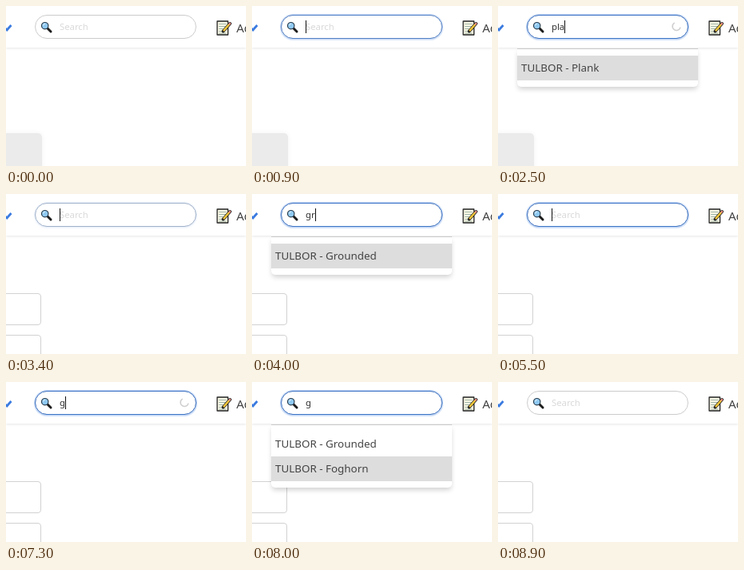
These frames come from a looping animation (300 px wide and 200 px high, 10 s). An HTML page:

```html
<!DOCTYPE html>
<html lang="en">
<head>
<meta charset="utf-8">
<title>Search demo</title>
<style>
  html, body { margin: 0; width: 100%; height: 100%; overflow: hidden; background: #fff; }
  body { position: relative; font-family: "Noto Sans", "Open Sans", sans-serif; color: #444; }
  body * { position: absolute; box-sizing: border-box; }
  svg * { position: static; }

  .card { left: -20px; top: 159px; width: 65px; height: 60px; background: #ebebeb;
          border-radius: 5px; box-shadow: 0 0 6px rgba(0, 0, 0, .06); }
  .field { left: -20px; width: 64px; height: 40px; border: 1px solid #d2d2d2; border-radius: 4px; }

  .header { left: 0; top: 0; width: 300px; height: 52px; background: #fff;
            box-shadow: 0 1px 3px rgba(0, 0, 0, .1); }
  .icons { left: 0; top: 0; }
  .add { left: 288px; top: 12px; font-size: 15px; line-height: 30px; white-space: nowrap; }
  #bar { left: 0; top: 0; height: 2px; background: #2f7fe0; }

  .input, #ring { left: 36px; top: 11px; width: 202px; height: 30px; border-radius: 15px; }
  .input { border: 1px solid #ccc; }
  #ring { border: 1px solid #3d74c6; box-shadow: 0 0 0 1px #c3d7f5, 0 1px 1px 1px #d6e4fa; }
  #hint, .entry { left: 67px; top: 18px; height: 16px; font-size: 11.3px; line-height: 16px; white-space: pre; }
  #hint { color: #d9d9d9; }
  .entry { display: flex; color: #333; }
  .entry * { position: static; }
  #caret { width: 1px; height: 16px; background: #111; }

  #menu { left: 24px; top: 53px; width: 226px; padding: 9px 0 8px; background: #fff;
          border-top: 1px solid #ccc; border-radius: 0 0 5px 5px;
          box-shadow: 0 4px 6px -1px rgba(0, 0, 0, .18); }
  #menu { padding-top: 8px; }
  .item { position: static; height: 31px; padding-left: 5px; font-size: 13.4px; line-height: 31px; white-space: pre; }
</style>
</head>
<body>
  <div class="card" id="card"></div>
  <div id="fields">
    <div class="field" style="top:124px"></div>
    <div class="field" style="top:176px"></div>
  </div>

  <div class="header"></div>
  <div id="menu"><div class="item"></div><div class="item"></div></div>

  <div class="input"></div>
  <div id="ring"></div>
  <svg class="icons" width="300" height="52" fill="none" stroke-linecap="round" stroke-linejoin="round">
    <path d="M-3 26L1.2 30L6.5 24" stroke="#3b7be0" stroke-width="2.8" stroke-linecap="butt" stroke-linejoin="miter"/>
    <path d="M52 28L56 32" stroke="#1c1c1c" stroke-width="3"/>
    <circle cx="48.7" cy="24.7" r="4.2" fill="#8fcaf2" stroke="#2b3d4d" stroke-width="1.2"/>
    <path d="M46.4 24.2Q46.8 22.4 48.6 22.2" stroke="#e4f4ff"/>
    <path d="M264 19H277.5V36H264Z" fill="#fbf8e6" stroke="#222" stroke-width="1.3"/>
    <path d="M266.5 22.5H275M266.5 25.5H274M266.5 28.5H271M266.5 31.5H270M266.5 34H275" stroke="#9db3a5"/>
    <path d="M271.5 31.5L280 22" stroke="#222" stroke-width="4"/>
    <path d="M272.5 30.4L279 23" stroke="#f5c73a" stroke-width="2.4"/>
    <path d="M279.4 22.6L280 22" stroke="#e58a83" stroke-width="2.4"/>
    <path id="spinner" d="M220.2 21.4A5 5 0 1 0 227.8 27.2" stroke="#cfcfcf" stroke-width="1.6"/>
  </svg>
  <div id="hint">Search</div>
  <div class="entry"><span id="typed"></span><span id="caret"></span></div>
  <div class="add">Add</div>
  <div id="bar"></div>

<script>
  const LOOP = 10000;
  const PLANK = "TULBOR - Plank", GROUNDED = "TULBOR - Grounded";
  const idle = { focus: 0, caret: 0, text: "", spin: 0, items: [], mark: [1, 0], bar: 0 };

  // Each step keeps whatever it does not mention from the step before.
  const steps = [
    [0, { ...idle, form: 0 }],
    [100, { bar: 150 }], [200, { bar: 300 }], [300, { bar: 0 }],
    [900, { focus: .85, caret: 1 }], [1000, { focus: 1 }],
    [1500, { caret: 0 }],
    [1700, { text: "p", caret: 1, spin: 1 }],
    [1800, { text: "pl", spin: 0, items: [PLANK, "TULBOR - Splinter"] }],
    [2000, { text: "pla" }],
    [2500, { spin: 1, items: [PLANK] }],
    [2600, { ...idle, form: 1 }],
    [2800, { bar: 150 }], [2900, { bar: 300 }], [3000, { bar: 0 }],
    [3400, { focus: .3, caret: 1 }], [3500, { focus: .8 }], [3600, { focus: 1 }],
    [3800, { text: "g", items: [GROUNDED, "TULBOR - Foghorn"] }],
    [4000, { text: "gr", items: [GROUNDED] }],
    [4100, { spin: 1 }], [4200, { spin: 0 }],
    [4600, { ...idle, focus: .4 }], [4700, { focus: 0 }],
    [4900, { bar: 300 }], [5000, { bar: 0 }],
    [5500, { focus: 1, caret: 1 }],
    [6000, { caret: 0 }], [6500, { caret: 1 }], [7100, { caret: 0 }],
    [7300, { text: "g", caret: 1, spin: 1 }],
    [7400, { spin: 0, items: [GROUNDED, "TULBOR - Foghorn"] }],
    [7600, { caret: 0 }],
    [7900, { mark: [.5, .5] }], [8000, { mark: [0, 1] }],
    [8200, { caret: 1 }],
    [8600, idle],
    [8800, { bar: 282 }], [8900, { bar: 0 }]
  ];

  let state = {};
  const scenes = steps.map(([time, change]) => ({ time, ...(state = { ...state, ...change }) }));

  const $ = id => document.getElementById(id);
  const rows = [...document.querySelectorAll(".item")];
  const show = (el, on) => { el.style.display = on ? "" : "none"; };

  function draw(s) {
    show($("card"), !s.form);
    show($("fields"), s.form);
    show($("hint"), !s.text);
    show($("spinner"), s.spin);
    show($("menu"), s.items.length);
    $("ring").style.opacity = s.focus;
    $("caret").style.opacity = s.caret;
    $("typed").textContent = s.text;
    $("bar").style.width = s.bar + "px";
    rows.forEach((row, i) => {
      show(row, i < s.items.length);
      row.textContent = s.items[i] || "";
      row.style.background = `rgba(0, 0, 0, ${s.mark[i] * .135})`;
    });
  }

  const start = performance.now();
  let current;
  function tick() {
    const time = (performance.now() - start) % LOOP;
    const scene = scenes.findLast(s => s.time <= time) || scenes[0];
    if (scene !== current) draw(current = scene);
    requestAnimationFrame(tick);
  }
  tick();
</script>
</body>
</html>
```
